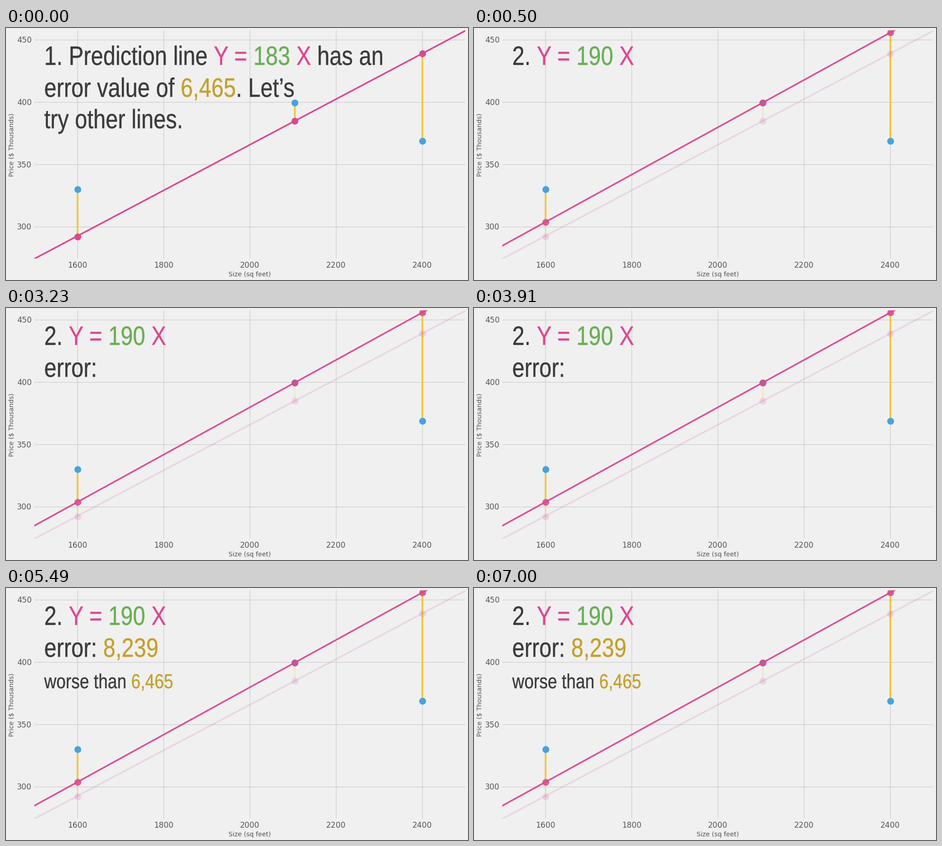
Animation of 1013x553 px, one loop 8000 ms. Source, as a matplotlib script:

```python
import matplotlib.pyplot as plt
from matplotlib.animation import FuncAnimation
from matplotlib.patches import PathPatch
from matplotlib.textpath import TextPath
from matplotlib.transforms import Affine2D

W, H, DPI = 1013, 553, 100
PX = 72 / DPI                      # points per pixel
LOOP, STEP = 8000, 20

BG, GRID, GREY = "#f0f0f0", "#cbcbcb", "#555555"
DARK, PINK, GREEN, GOLD = "#3b3b3b", "#db4891", "#69ae53", "#c4a02c"
BLUE, YELLOW, MAUVE = "#4aa2d9", "#f3c734", "#cf4cb0"

SIZES = [1600, 2104, 2400]
PRICES = [330, 399.8, 369]
FIRST = [292, 385, 439]
SECOND = [304, 399.8, 456]

FACE = dict(family="Liberation Sans")
CONDENSE = 0.8285                  # one narrow cut for all the headings
BIG, SMALL = 58.5, 44.5
LEFT, ROWS = 83.8, (81, 151, 220)

fig = plt.figure(figsize=(W / DPI, H / DPI), dpi=DPI, facecolor=BG)


def pixel_box(left, top, right, bottom):
    return [left / W, 1 - bottom / H, (right - left) / W, (bottom - top) / H]


ax = fig.add_axes(pixel_box(62, 5, 1007, 506))
ax.set(xlim=(1499.5, 2499.5), ylim=(274.6, 457.8))
ax.axis("off")

page = fig.add_axes([0, 0, 1, 1])
page.set(xlim=(0, W), ylim=(H, 0))
page.axis("off")


def label(x, y, text, size, ha="center", rotation=0):
    page.text(x, y, text, fontsize=size * PX, family="DejaVu Sans", color=GREY,
              ha=ha, va="baseline", rotation=rotation, rotation_mode="anchor")


def draw_frame():
    rule = dict(color=GRID, lw=1.2 * PX, zorder=1, snap=False)
    for x in range(1600, 2401, 200):
        ax.axvline(x, **rule)
        label(156.7 + (x - 1600) * 0.945, 526.5, str(x), 17)
    for y in range(300, 451, 50):
        ax.axhline(y, **rule)
        label(56.5, 32.2 + (450 - y) * 2.735, str(y), 17, ha="right")
    label(534.5, 544.5, "Size (sq feet)", 14)
    label(17, 256.5, "Price ($ Thousands)", 14, rotation=90)


def dots(ys, color, alpha, z):
    return ax.plot(SIZES, ys, "o", ms=15 * PX, mew=0, color=color,
                   alpha=alpha, zorder=z, snap=False)


def prediction(slope, ys, color, alpha, bar_alpha, z):
    """Line, predicted points and error bars of one guess."""
    ends = [1490, 2510]
    parts = ax.plot(ends, [slope * x / 1000 for x in ends], color=color,
                    lw=3.5 * PX, alpha=alpha, zorder=z)
    parts += dots(ys, color, alpha, z + 3)
    parts.append(ax.vlines(SIZES, ys, PRICES, color=YELLOW, lw=3.7 * PX,
                           alpha=bar_alpha, zorder=2, snap=False))
    return parts


def outline(text, size):
    return TextPath((0, 0), text, size=size, prop=FACE)


def advance(text, size):
    bar = outline("|", size).get_extents().x1
    return outline(text + "|", size).get_extents().x1 - bar


def heading(row, pieces, size=BIG):
    """Set coloured pieces of text one after another on a row."""
    patches, x = [], LEFT
    for text, color in pieces:
        place = Affine2D().scale(CONDENSE, -1).translate(x, ROWS[row])
        patch = PathPatch(outline(text, size).transformed(place), fc=color,
                          ec=color, lw=0.4 * PX)
        patches.append(page.add_patch(patch))
        x += advance(text, size) * CONDENSE
    return patches


draw_frame()
dots(PRICES, BLUE, 1, 6)

intro = prediction(183, FIRST, PINK, 1, 1, 5)
intro += heading(0, [("1. Prediction line ", DARK), ("Y = ", PINK),
                     ("183 ", GREEN), ("X ", PINK), ("has an", DARK)])
intro += heading(1, [("error value of ", DARK), ("6,465", GOLD),
                     (". Let\u2019s", DARK)])
intro += heading(2, [("try other lines.", DARK)])

guess = prediction(183, FIRST, MAUVE, 0.17, 0.2, 2.5)
new_line, new_dots, new_bars = prediction(190, SECOND, PINK, 0.96, 1, 5)
new_dots.set_alpha(0.87)
guess += [new_line, new_dots, new_bars]
guess += heading(0, [("2. ", DARK), ("Y = ", PINK), ("190 ", GREEN),
                     ("X", PINK)])
error_word, error_value = heading(1, [("error: ", DARK), ("8,239", GOLD)])
verdict = heading(2, [("worse than ", DARK), ("6,465", GOLD)], SMALL)

# artists with the time span in which they show
CUES = [(intro, 0, 500), (guess, 500, LOOP), ([error_word], 3230, LOOP),
        ([error_value], 4360, LOOP), (verdict, 5490, LOOP)]


def update(i):
    now = i * STEP + STEP / 2
    for artists, start, end in CUES:
        for artist in artists:
            artist.set_visible(start <= now < end)
    return []


anim = FuncAnimation(fig, update, frames=LOOP // STEP, interval=STEP,
                     init_func=lambda: update(0), repeat=True, repeat_delay=0,
                     blit=False)
plt.show()
```
